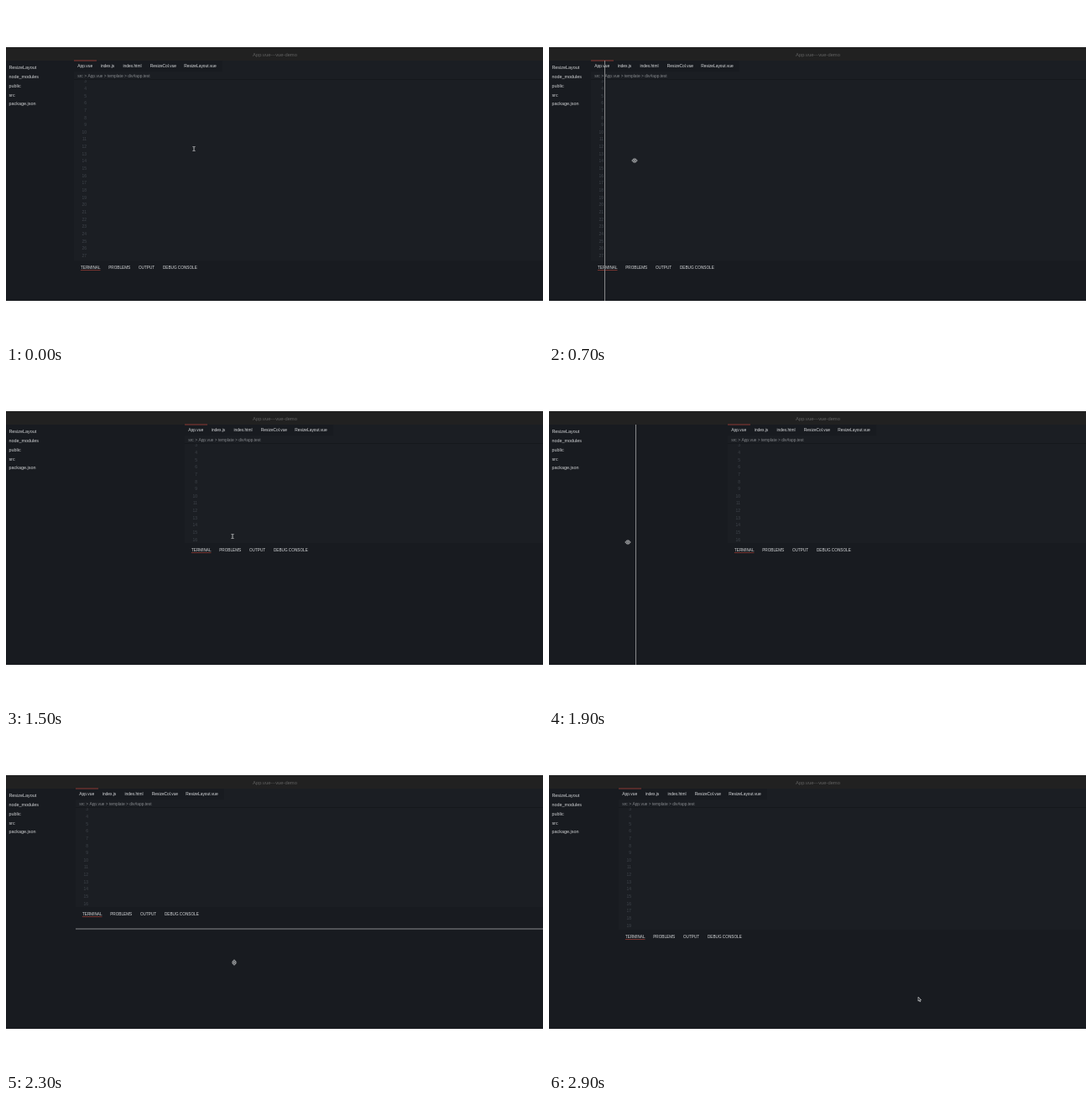
An HTML page with a canvas for the animation above (3 s loop, 640 by 400 pixels).

```html
<!DOCTYPE html>
<html lang="en">
<head>
<meta charset="utf-8">
<title>Resizable layout</title>
<style>
  html, body { margin: 0; height: 100%; overflow: hidden; background: #fff; }
  canvas { display: block; }
</style>
</head>
<body>
<canvas id="stage" width="640" height="400"></canvas>
<script>
const ctx = document.getElementById('stage').getContext('2d');
const LOOP = 3000, STEP = 100;
const TOP = 49, BODY = 65, END = 351;

// Pane sizes jump when a drag is released: [time, editor left, editor bottom]
const layouts = [
  [0, 81, 303], [600, 50, 303], [900, 213, 303], [1200, 213, 206],
  [2000, 83, 206], [2400, 83, 297], [2800, 83, 233],
];

// Pointer path: [time, x, y, cursor]
const pointer = [
  [0, 224, 170, 'text'], [300, 81, 183, 'col'], [500, 50, 184, 'col'],
  [600, 50, 184, 'col'], [700, 102, 184, 'col'], [900, 213, 190, 'col'],
  [1000, 278, 303, 'row'], [1100, 282, 211, 'row'], [1200, 282, 206, 'row'],
  [1300, 283, 200, 'text'], [1500, 270, 198, 'text'], [1800, 213, 205, 'col'],
  [1900, 94, 205, 'col'], [2000, 83, 205, 'col'], [2100, 180, 200, 'text'],
  [2200, 270, 206, 'row'], [2300, 272, 272, 'row'], [2400, 270, 297, 'row'],
  [2500, 221, 286, 'text'], [2600, 222, 297, 'row'], [2700, 226, 250, 'row'],
  [2800, 230, 233, 'row'], [2900, 441, 316, 'arrow'],
];

// Guide line while dragging: time -> [axis, position]
const guides = {
  400: ['x', 72], 500: ['x', 53], 700: ['x', 66], 800: ['x', 130],
  1100: ['y', 224], 1900: ['x', 103], 2300: ['y', 232], 2700: ['y', 275],
};

const files = ['ResizeLayout', 'node_modules', 'public', 'src', 'package.json'];
const tabs = [['App.vue', 4.3], ['index.js', 31.8], ['index.html', 58.5],
  ['ResizeCol.vue', 90.8], ['ResizeLayout.vue', 131.2]];
const panels = [['TERMINAL', 7.9], ['PROBLEMS', 41.2], ['OUTPUT', 76.9], ['DEBUG CONSOLE', 105.9]];

function rect(color, x, y, w, h) {
  ctx.fillStyle = color;
  ctx.fillRect(x, y, w, h);
}

function text(str, x, y, size, color, align = 'left') {
  ctx.font = `${size}px "Liberation Sans", Arial, sans-serif`;
  ctx.textAlign = align;
  ctx.fillStyle = color;
  ctx.fillText(str, x, y);
}

const lastBefore = (keys, t) => keys.filter(k => k[0] <= t).pop();

function pointerAt(t) {
  const a = lastBefore(pointer, t);
  const b = pointer[pointer.indexOf(a) + 1] || a;
  const p = a === b ? 0 : (t - a[0]) / (b[0] - a[0]);
  return [a[1] + (b[1] - a[1]) * p, a[2] + (b[2] - a[2]) * p, a[3]];
}

function drawCursor([x, y, kind]) {
  ctx.save();
  ctx.translate(x, y);
  if (kind === 'text') {
    rect('#b4b6b8', -0.5, -2.5, 1, 5);
    rect('#a0a2a5', -1.7, -3, 3.4, 0.8);
    rect('#a0a2a5', -1.7, 2.2, 3.4, 0.8);
  } else {
    const shape = kind === 'arrow'
      ? 'M-1 -3V2L0.2 1L1 2.8L1.8 2.4L1 0.7H2.6Z'
      : 'M-0.7 -2.4V2.4L-3.3 0ZM0.7 -2.4V2.4L3.3 0Z';
    if (kind === 'row') ctx.rotate(Math.PI / 2);
    const path = new Path2D(shape);
    ctx.fillStyle = kind === 'arrow' ? '#30343a' : '#55585d';
    ctx.fill(path);
    ctx.strokeStyle = '#c4c6c8';
    ctx.lineWidth = 0.7;
    ctx.stroke(path);
  }
  ctx.restore();
}

function drawEditor(left, bottom) {
  rect('#1b1e23', left, BODY, 640 - left, bottom - BODY);
  rect('#181b20', left, BODY, 177, 13);
  rect('#8c3a34', left, BODY - 0.5, 27, 1);
  tabs.forEach(([name, dx]) => text(name, left + dx, 73.4, 4.85, '#dcdee0'));
  text('src > App.vue > template > div#app.test', left + 4.3, 84.8, 4.9, '#85888c');

  ctx.save();
  ctx.beginPath();
  ctx.rect(left, 88, 640 - left, bottom - 88);
  ctx.clip();
  for (let n = 3; n <= 27; n++) {
    text(n, left + 15, 99.9 + (n - 4) * 8.657, 4.9, '#41464d', 'right');
  }
  ctx.restore();
  rect('#15181c', left, 87, 640 - left, 1);
}

function draw(t) {
  const [, left, bottom] = lastBefore(layouts, t);
  rect('#fff', 0, 0, 640, 400);
  rect('#181b20', 0, TOP, 640, END - TOP);
  rect('#212121', 0, TOP, 640, BODY - TOP);
  text('App.vue---vue-demo', 320.5, 60.4, 5.8, '#626262', 'center');
  files.forEach((name, i) => text(name, 3.4, 75.4 + i * 10.7, 5.45, '#d2d4d6'));

  drawEditor(left, bottom);
  panels.forEach(([name, dx]) => text(name, left + dx, bottom + 9.7, 4.7, '#dcdee0'));
  rect('#8c3a34', left + 7.9, bottom + 11, 23.6, 0.8);

  const guide = guides[t];
  if (guide) {
    const [axis, pos] = guide;
    if (axis === 'x') rect('#88898b', pos, BODY, 1, END - BODY);
    else rect('#88898b', left, pos - 0.5, 640 - left, 1);
  }
  drawCursor(pointerAt(t));
}

function tick() {
  draw(Math.floor(performance.now() % LOOP / STEP) * STEP);
  requestAnimationFrame(tick);
}
tick();
</script>
</body>
</html>
```
